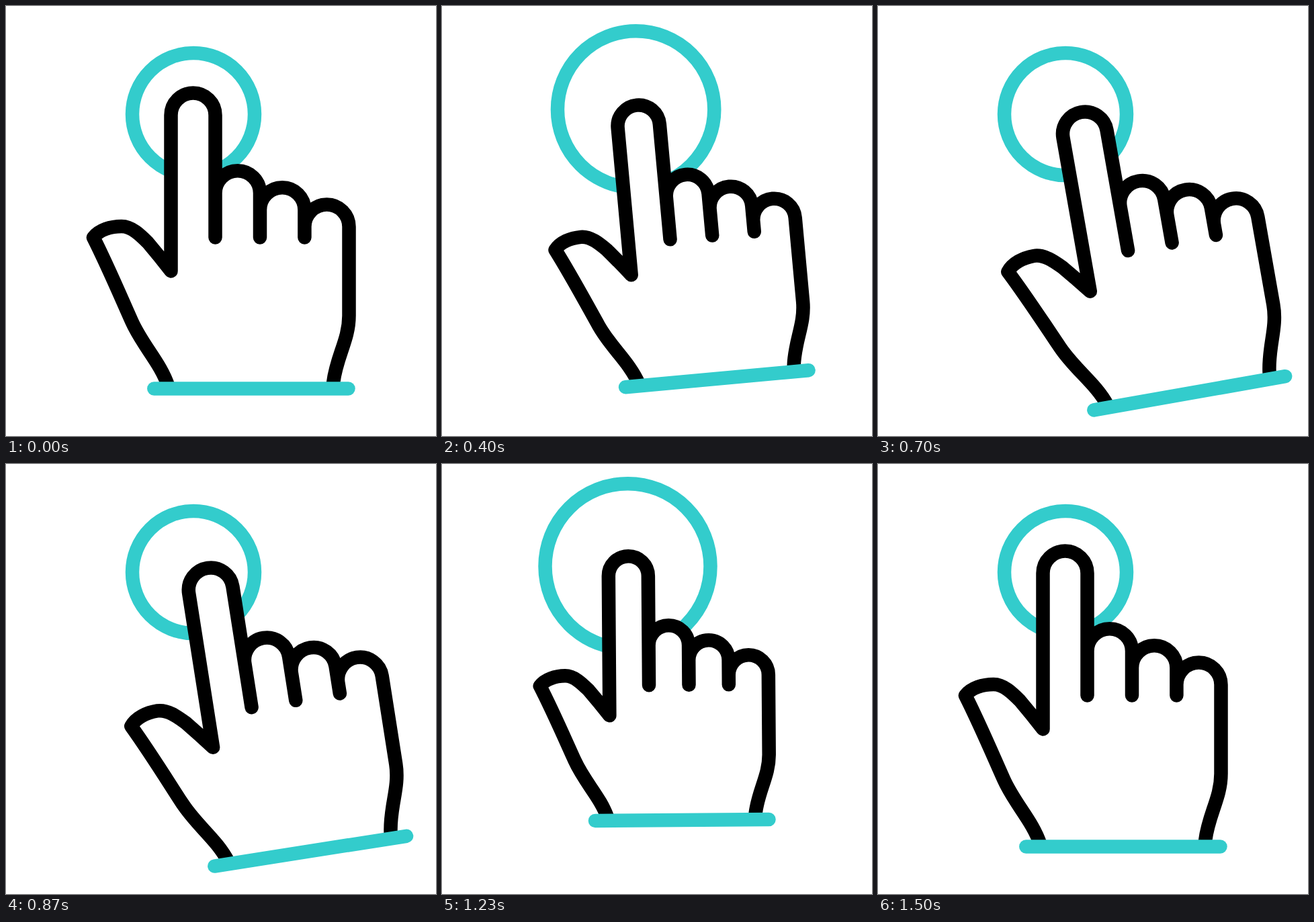
Animation of 640x640 px, one loop 1670 ms. Source, as an HTML page:

```html
<!DOCTYPE html>
<html lang="en">
<head>
<meta charset="utf-8">
<title>Tap gesture</title>
<style>
  html, body { margin: 0; width: 100%; height: 100%; overflow: hidden; background: #fff; }
  svg { display: block; width: 100%; height: 100%; }
  svg * { stroke-linecap: round; stroke-linejoin: round; }
</style>
</head>
<body>
<svg viewBox="0 0 640 640">
  <circle id="ring" fill="none" stroke="#33cccc" stroke-width="20.5"/>
  <g id="hand" fill="#fff" stroke="#000">
    <path d="M241.5 566 C230 531 203.5 506 187 469 C170 431 151 386 130 344.5
      C139 333 156 328 172 328 C187 328 200 341 211 352 C222 365 235 381 245.5 394.5
      V162.5 A33 33 0 0 1 311.5 162.5 V344.5
      V278.5 A33.2 33.2 0 0 1 378 278.5 V344.5
      V303.5 A33.2 33.2 0 0 1 444.4 303.5 V344.5
      V328.5 A33 33 0 0 1 510.5 328.5 V461
      C510.5 497 492 521 487.2 560 L486.6 566"/>
    <path d="M220.3 569.5 H509.5" stroke="#33cccc"/>
  </g>
</svg>
<script>
const LOOP = 1670, FPS = 30, LINE = 20.5;
const TIP = { x: 278.5, y: 162.5 };
const ring = document.getElementById('ring');
const hand = document.getElementById('hand');

const clamp = v => Math.min(1, Math.max(0, v));
const smooth = u => u * u * (3 - 2 * u);
// bend > 0 makes the start of the move quicker than its end
const ease = (k, from, to, bend = 0) => {
  const x = clamp((k - from) / (to - from));
  return smooth(x + bend * x * (1 - x));
};
const pulse = (k, from, peak, to) => ease(k, from, peak) - ease(k, peak, to);

function draw(ms) {
  const k = Math.floor((Math.floor(ms / 10) * 10 + 4) * FPS / 1000);

  const wave1 = pulse(k, 7, 14, 21);
  const wave2 = pulse(k, 30, 37, 44.5);
  const wave = wave1 + wave2;
  ring.setAttribute('cx', 279 + 12 * wave1 - 2.5 * wave2);
  ring.setAttribute('cy', 161 - 8.8 * wave);
  ring.setAttribute('r', 91 + 32 * wave);

  const lean = ease(k, 3.9, 19.6) - ease(k, 23.35, 39.75, 0.32);
  const press = pulse(k, 2.3, 8.2, 14.5) + pulse(k, 29.3, 34.6, 41);
  const size = 1 - 0.155 * press;
  const x = TIP.x + 29.5 * lean + 22.5 * (size - 1);
  const y = TIP.y + 28 * lean - 28.8 * (size - 1);
  hand.setAttribute('transform',
    `translate(${x} ${y}) rotate(${-10 * lean}) scale(${size}) translate(${-TIP.x} ${-TIP.y})`);
  hand.setAttribute('stroke-width', LINE / size);
}

const start = performance.now();
function tick() {
  draw((performance.now() - start) % LOOP);
  requestAnimationFrame(tick);
}
draw(0);
requestAnimationFrame(tick);
</script>
</body>
</html>
```
